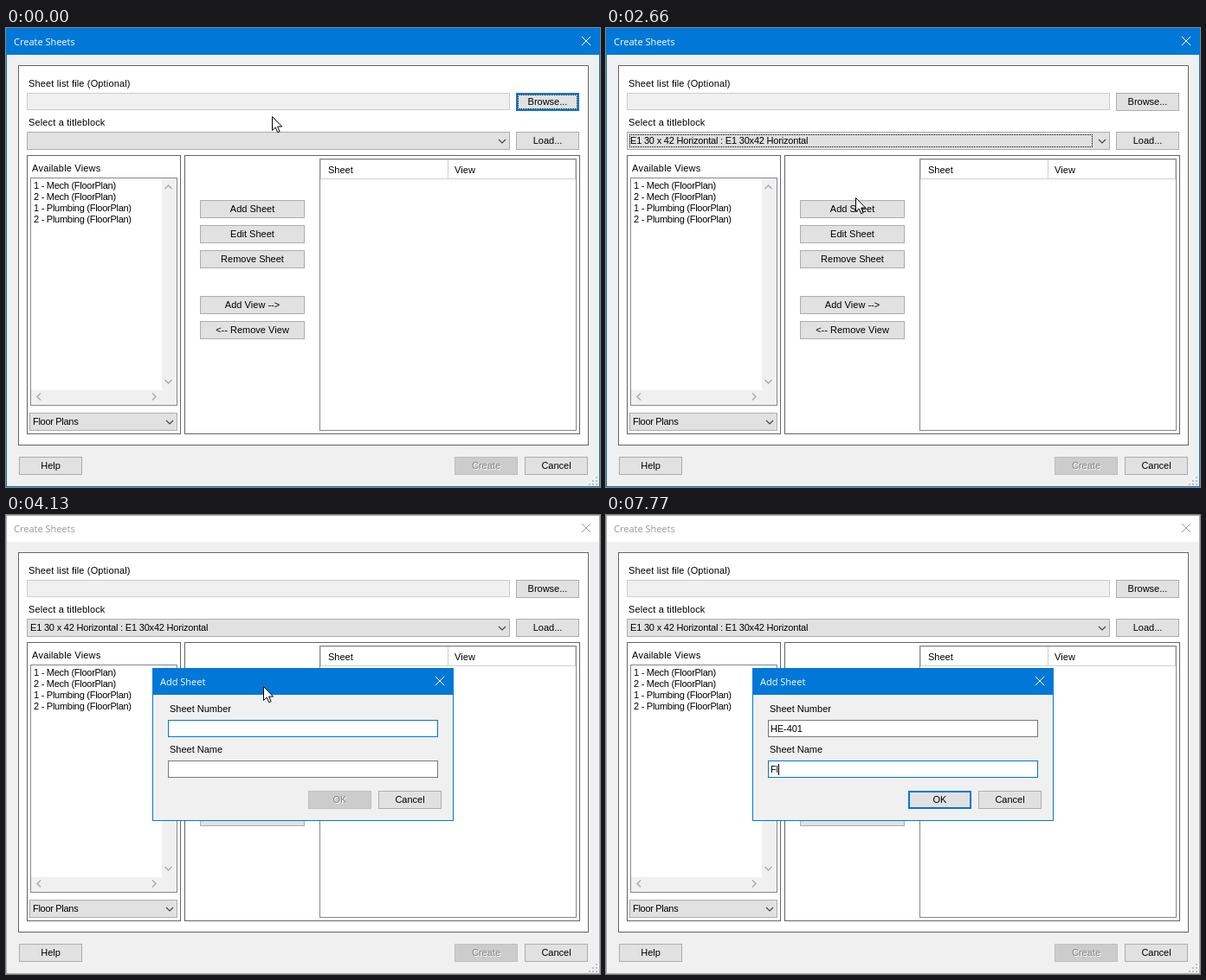
An HTML page for the animation above (8 s loop, 686x531 px).

```html
<!DOCTYPE html>
<html lang="en">
<head>
<meta charset="utf-8">
<title>Create Sheets</title>
<style>
html, body { margin: 0; width: 100%; height: 100%; overflow: hidden; }
body { position: relative; font: 11px/12px "Liberation Sans", Arial, sans-serif; font-kerning: none; color: #000; }
div, svg { position: absolute; box-sizing: border-box; white-space: pre; }
svg { left: 0; top: 0; overflow: visible; fill: none; }
.window { background: #f0f0f0; border: 1px solid #0078d7; }
.bar { background: #0078d7; }
.title { font: 11px/15px "Open Sans", "Noto Sans", sans-serif; color: #fff; }
.close { stroke: #fff; }
.inactive { border-color: #aaa; }
.inactive > .bar { background: #fff; }
.inactive > .title { color: #999; }
.inactive .close { stroke: #999; }
.panel { background: #fff; border: 1px solid #646464; }
.list { background: #fff; border: 1px solid #828790; }
.field { border: 1px solid #ccc; background: #f0f0f0; }
.wide { letter-spacing: .15px; }
.rows { line-height: 13px; letter-spacing: -.27px; }
.scroll { background: #f0f0f0; }
.line { background: #d0d0d0; }
.button, .combo { background: #e1e1e1; border: 1px solid #adadad; line-height: 19px; }
.button { text-align: center; }
.combo { padding-left: 3px; letter-spacing: -.19px; }
.default { border: 2px solid #0078d7; line-height: 17px; }
.disabled { background: #ccc; border-color: #bfbfbf; color: #838383; text-shadow: 1px 1px #fff; }
.focus { border: 1px dotted #000; }
.drop { background: #fff; border: 1px solid #000; line-height: 13px; padding-left: 2px; letter-spacing: -.19px; }
.drop.hot { background: #0078d7; color: #fff; outline: 1px dotted #ff8728; outline-offset: -2px; }
.input { background: #fff; border: 1px solid #7a7a7a; line-height: 18px; padding-left: 2px; letter-spacing: -.1px; }
.input.caret::after { content: ""; display: inline-block; width: 1px; height: 13px; background: #000; vertical-align: -3px; }
.click { border-radius: 50%; background: rgba(255, 240, 60, .65); }
</style>
</head>
<body>
<script>
const svgNS = "http://www.w3.org/2000/svg";

function add(parent, cls, x, y, w, h, text = "") {
  const el = document.createElement("div");
  el.className = cls;
  el.style.cssText = `left:${x}px;top:${y}px;` + (w ? `width:${w}px;height:${h}px` : "");
  el.textContent = text;
  parent.append(el);
  return el;
}

function group(parent, x = 0, y = 0) {
  return add(parent, "", x, y, 686, 531);
}

function draw(parent, shapes) {
  const svg = document.createElementNS(svgNS, "svg");
  svg.setAttribute("width", 1);
  svg.setAttribute("height", 1);
  svg.innerHTML = shapes;
  parent.append(svg);
  return svg;
}

const button = (parent, x, y, w, text, cls = "") => add(parent, "button " + cls, x, y, w, 21, text);
const cross = (x, y) => `<path class="close" d="M${x} ${y}l10 10m0-10l-10 10"/>`;

// Main window
const main = group(document.body);
const frame = add(main, "window", 0, 0, 686, 531);
const bar = add(frame, "bar", -1, -1, 686, 31);
bar.style.cssText += "border:inherit;border-bottom:0";
add(frame, "title", 8, 7, 0, 0, "Create Sheets");
draw(frame, cross(664, 9));

add(main, "panel", 14, 43, 659, 440);
add(main, "wide", 26, 58, 0, 0, "Sheet list file (Optional)");
add(main, "field", 24, 75, 558, 20);
const browse = button(main, 589, 75, 73, "Browse...");
const browseFocus = add(main, "focus", 591, 77, 69, 17);
add(main, "wide", 26, 103, 0, 0, "Select a titleblock");
const titleblock = "E1 30 x 42 Horizontal : E1 30x42 Horizontal";
const combo = add(main, "combo", 24, 120, 558, 21);
const comboFocus = add(main, "focus", 27, 123, 535, 15);
button(main, 589, 120, 73, "Load...");

add(main, "panel", 24, 147, 178, 323);
add(main, "wide", 30, 156, 0, 0, "Available Views");
add(main, "list", 28, 173, 170, 264);
add(main, "rows", 32, 176, 0, 0,
  ["1 - Mech", "2 - Mech", "1 - Plumbing", "2 - Plumbing"].map(v => v + " (FloorPlan)").join("\n"));
add(main, "scroll", 180, 174, 17, 262);
add(main, "scroll", 29, 419, 168, 17);
add(main, "combo", 27, 445, 171, 21, "Floor Plans").style.letterSpacing = "-.3px";

add(main, "panel", 206, 147, 457, 323);
add(main, "list", 362, 151, 297, 315);
add(main, "line", 363, 152, 295, 1);
add(main, "line", 363, 174, 295, 1);
for (const x of [363, 510, 657]) add(main, "line", x, 153, 1, 22);
add(main, "", 372, 158, 0, 0, "Sheet");
add(main, "", 518, 158, 0, 0, "View");
const addSheet = button(main, 224, 199, 121, "Add Sheet");
button(main, 224, 228, 121, "Edit Sheet");
button(main, 224, 257, 121, "Remove Sheet");
button(main, 224, 310, 121, "Add View -->");
button(main, 224, 339, 121, "<-- Remove View");
button(main, 15, 496, 73, "Help");
button(main, 518, 496, 73, "Create", "disabled");
button(main, 599, 496, 73, "Cancel");
draw(main, `
  <path stroke="#444" stroke-width="1.2" d="M569 129l4 4 4-4M185 454l4 4 4-4"/>
  <path stroke="#a9a9a9" stroke-width="1.4" d="M183.500 186l4-4 4 4M183.500 407l4 4 4-4M40 422.500l-4 4 4 4M169 422.500l4 4-4 4"/>
  <path stroke="#bfbfbf" stroke-width="2" d="M681 520h2M677 524h2m2 0h2M673 528h2m2 0h2m2 0h2"/>`);
const drop = add(main, "drop", 24, 141, 558, 15, titleblock);

// Add Sheet dialog
const dialog = add(document.body, "", 169, 177, 348, 177);
add(dialog, "window", 0, 0, 348, 177);
add(dialog, "bar", 0, 0, 348, 31);
add(dialog, "title", 9, 8, 0, 0, "Add Sheet");
draw(dialog, cross(327, 10));
add(dialog, "", 20, 41, 0, 0, "Sheet Number");
const number = add(dialog, "input", 18, 60, 312, 20);
add(dialog, "", 20, 88, 0, 0, "Sheet Name");
const name = add(dialog, "input", 18, 107, 312, 20);
const ok = button(dialog, 180, 142, 73, "OK");
button(dialog, 261, 142, 73, "Cancel");

// Pointer
const click = add(document.body, "click", 0, 0, 24, 24);
const pointer = draw(document.body,
  '<path fill="#fff" stroke="#000" d="M.5.5v16l3.700-3.500 2.500 5.700 2.400-1-2.500-5.700h5z"/>');

const clamp = v => Math.max(0, Math.min(1, v));
const show = (el, on) => { el.style.visibility = on ? "visible" : "hidden"; };

function mix(a, b, p) {
  const channels = c => [1, 3, 5].map(i => parseInt(c.slice(i, i + 2), 16));
  const end = channels(b);
  return `rgb(${channels(a).map((v, i) => Math.round(v + (end[i] - v) * p))})`;
}

function tint(el, fill, edge) {
  el.style.backgroundColor = fill;
  el.style.borderColor = edge;
}

// Screen-capture motion: advances in equal steps, the first at `from`, the last at `to`
const stepped = (t, from, to, steps) =>
  clamp(Math.floor((t - from) / (to - from) * (steps - 1) + 1.001) / steps);

const typed = (t, text, times) => text.slice(0, times.filter(at => t >= at).length);

function pointerAt(t) {
  if (t >= 4050) return [297, 198];
  if (t >= 3040) return [291, 205];
  const a = stepped(t, 90, 470, 6);
  const b = stepped(t, 1160, 1330, 3);
  const c = 1 - (1 - stepped(t, 2400, 2890, 7)) ** 2.3;
  return [307 - 26 * a - 10 * b + 20 * c, 102 + 31 * a + 13 * b + 58 * c].map(Math.round);
}

function render(t) {
  const [x, y] = pointerAt(t);
  pointer.style.transform = `translate(${x}px,${y}px)`;
  show(pointer, t < 4510);
  click.style.transform = `translate(${x - 13}px,${y - 13}px)`;
  show(click, [[700, 860], [1800, 1940], [3430, 3500]].some(([from, to]) => t >= from && t < to));

  const opened = t >= 3500;
  frame.classList.toggle("inactive", opened);
  browse.classList.toggle("default", t < 700);
  show(browseFocus, t < 700);

  const hover = clamp(stepped(t, 90, 470, 6) * 2 - 1);
  const pressed = t >= 700 && t < 1940;
  const leave = stepped(t, 1940, 2170, 4);
  if (t < 700) tint(combo, mix("#e1e1e1", "#e5f1fb", hover), mix("#adadad", "#0078d7", hover));
  else if (pressed) tint(combo, "#cce4f7", "#005499");
  else tint(combo, mix("#cce4f7", "#e1e1e1", leave), mix("#005499", "#adadad", leave));
  combo.textContent = t >= 1940 ? titleblock : "";
  show(comboFocus, t >= 1940 && t < 3430);
  show(drop, t >= 780 && t < 1940);
  drop.classList.toggle("hot", t >= 1160);

  const over = stepped(t, 2720, 2890, 3);
  addSheet.classList.toggle("default", opened);
  if (opened) tint(addSheet, "", "");
  else if (t >= 3430) tint(addSheet, "#cce4f7", "#005499");
  else tint(addSheet, mix("#e1e1e1", "#e5f1fb", over), mix("#adadad", "#0078d7", over));

  const grow = 1 - (1 - clamp((stepped(t, 3500, 3810, 5) - .2) / .8)) ** 2;
  show(dialog, opened);
  dialog.style.opacity = .15 + .85 * grow;
  dialog.style.transform = grow < 1 ? `scale(${.957 + .043 * grow})` : "none";

  const next = stepped(t, 6770, 7140, 5);
  number.textContent = typed(t, "HE-401", [4510, 4980, 5370, 5610, 6070, 6300]);
  name.textContent = typed(t, "Fl", [7540, 7770]);
  number.style.borderColor = mix("#0078d7", "#7a7a7a", next);
  name.style.borderColor = mix("#7a7a7a", "#0078d7", next);
  number.classList.toggle("caret", t < 4130 || t >= 4510 && t < 6770);
  name.classList.toggle("caret", t >= 6770);
  ok.classList.toggle("disabled", t < 7540);
  ok.classList.toggle("default", t >= 7540);
}

function tick() {
  render(performance.now() % 8000);
  requestAnimationFrame(tick);
}
tick();
</script>
</body>
</html>
```
